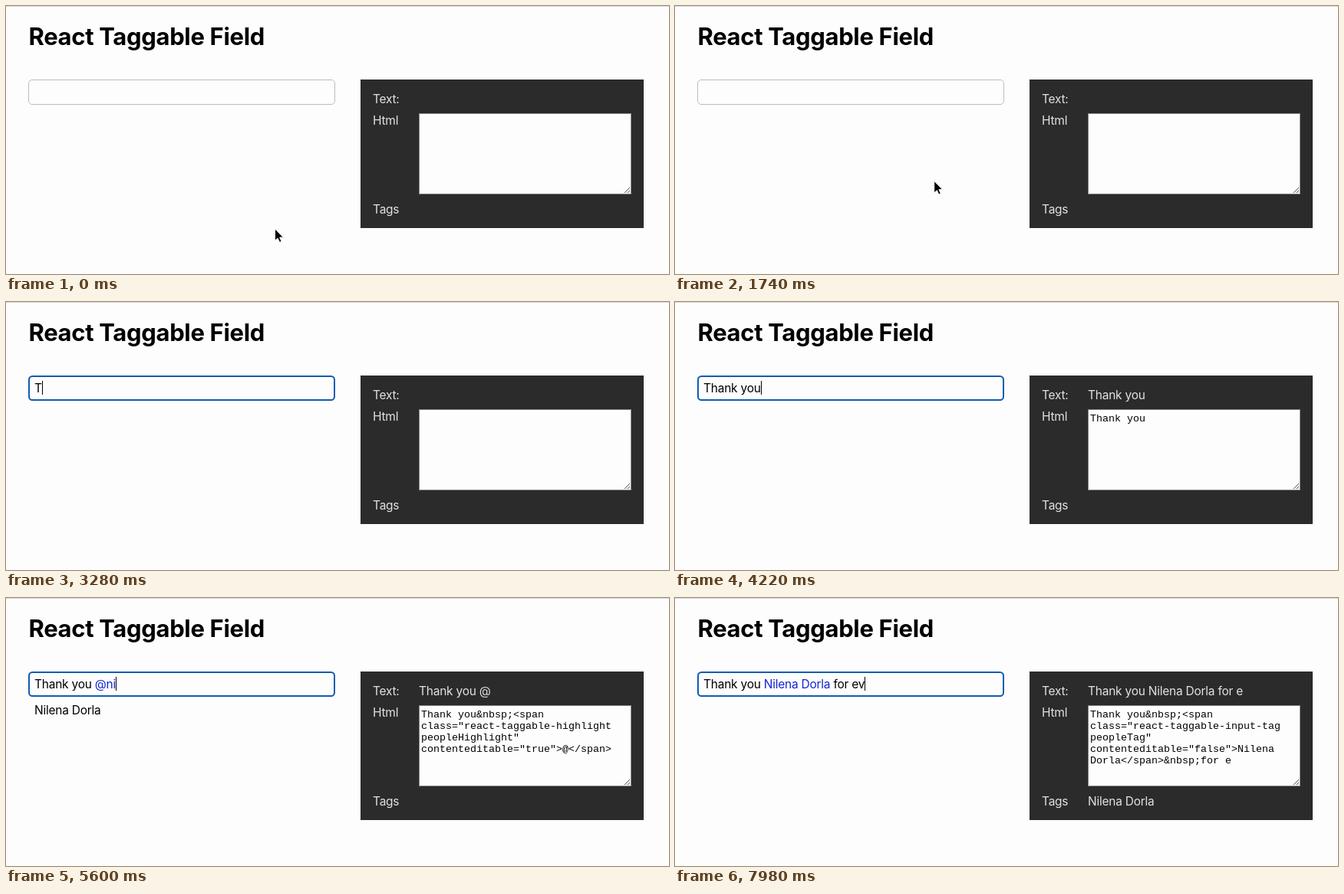
Recreate the animation shown at these times as an HTML page. Size 864 px wide and 350 px high, loop 8 s.

```html
<!DOCTYPE html>
<html lang="en">
<head>
<meta charset="utf-8">
<title>React Taggable Field</title>
<style>
  html, body { margin: 0; width: 100%; height: 100%; overflow: hidden; background: #fdfdfd; }
  svg { display: block; width: 864px; height: 350px; }
  text { font: 15.5px Inter, sans-serif; letter-spacing: -0.24px; white-space: pre; fill: #000; }
  .title { font-size: 31px; font-weight: 700; letter-spacing: -0.33px; }
  .panel text { fill: #e2e2e2; }
  .panel .code { font: 13.333px "Liberation Mono", monospace; letter-spacing: 0; fill: #000; }
  .blue { fill: #1226d0; }
</style>
</head>
<body>
<svg viewBox="0 0 864 350">
  <rect width="864" height="350" fill="#fdfdfd"/>
  <rect width="864" height="1" fill="#d8d8d8"/>
  <text class="title" x="29.5" y="51">React Taggable Field</text>

  <rect id="box" fill="#fdfdfd"/>
  <text id="field" x="37" y="118"><tspan id="before"></tspan><tspan id="tag" class="blue"></tspan><tspan id="after"></tspan></text>
  <rect id="caret" y="103" width="1" height="18" fill="#000"/>
  <text id="option" x="37" y="152"></text>

  <g class="panel">
    <rect x="462" y="96" width="369" height="194" fill="#2b2b2b"/>
    <text x="478" y="127">Text:</text>
    <text x="478" y="154.5">Html</text>
    <text x="478" y="271">Tags</text>
    <text id="plain" x="538" y="127"></text>
    <rect x="538.5" y="140.5" width="276" height="105" fill="#fdfdfd" stroke="#858585"/>
    <path d="M806 244l7-7M810 244l3-3" stroke="#555" stroke-width="1"/>
    <g id="code"></g>
    <text id="tags" x="538" y="271"></text>
  </g>

  <path id="mouse" d="M0 0V15.5L3.6 12.2L6.1 17.6L8.6 16.5L6.2 11.2H11Z" fill="#000" stroke="#fdfdfd" stroke-width="1"/>
</svg>
<script>
const LOOP = 8000;
const NAME = "Nilena Dorla";
const MOVE = 1540, ARRIVE = 2040, FOCUS = 2080, PICK = 6300, LAG = 50;
const $ = id => document.getElementById(id);

// [time, key] pairs for the three stretches of typing
const intro = [[3240, "T"], [3340, "h"], [3460, "a"], [3560, "n"], [3680, "k"],
  [3900, " "], [4000, "y"], [4080, "o"], [4160, "u"], [4400, " "]];
const query = [[4820, "@"], [5340, "n"], [5560, "i"]];
const outro = [[7280, "f"], [7360, "o"], [7440, "r"], [7560, " "], [7760, "e"], [7940, "v"]];
const events = [FOCUS, PICK, ...[...intro, ...query, ...outro].map(k => k[0])];

const typed = (keys, t) => keys.filter(k => k[0] <= t).map(k => k[1]).join("");
const set = (el, s) => { if (el.textContent !== s) el.textContent = s; };
const attrs = (el, o) => { for (const k in o) el.setAttribute(k, o[k]); };
const show = (id, on) => $(id).setAttribute("visibility", on ? "visible" : "hidden");
const ease = p => p * p * (3 - 2 * p);

const lines = Array.from({ length: 5 }, (_, i) => {
  const el = document.createElementNS("http://www.w3.org/2000/svg", "text");
  attrs(el, { class: "code", x: 541, y: 155.5 + i * 15 });
  return $("code").appendChild(el);
});

// Trailing spaces are stored as &nbsp;
const nbsp = s => s.replace(/ $/, "&nbsp;");

function markup(t) {
  const start = nbsp(typed(intro, t));
  if (t >= PICK) {
    const [first, last] = NAME.split(" ");
    return [start + "<span", 'class="react-taggable-input-tag', 'peopleTag"',
      'contenteditable="false">' + first, last + "</span>&nbsp;" + nbsp(typed(outro, t))];
  }
  if (t >= query[0][0])
    return [start + "<span", 'class="react-taggable-highlight', 'peopleHighlight"',
      'contenteditable="true">@</span>'];
  return [start];
}

function drawField(t) {
  const focused = t >= FOCUS, picked = t >= PICK;
  attrs($("box"), focused
    ? { x: 30, y: 97, width: 398, height: 31, rx: 4.5, stroke: "#105cb0", "stroke-width": 2 }
    : { x: 29.5, y: 96.5, width: 399, height: 32, rx: 4.5, stroke: "#bdbdbd", "stroke-width": 1 });
  set($("before"), typed(intro, t));
  set($("tag"), picked ? NAME : typed(query, t));
  set($("after"), picked ? " " + typed(outro, t) : "");
  set($("option"), t >= query[0][0] && !picked ? NAME : "");

  // The caret stays lit for half a second after each input
  const last = Math.max(...events.filter(e => e <= t));
  show("caret", focused && (t - last) % 1000 < 500);
  $("caret").setAttribute("x", Math.round(37 + $("field").getComputedTextLength()));
}

function drawPanel(t) {
  const picked = t >= PICK;
  set($("plain"), typed(intro, t) +
    (picked ? NAME + " " + typed(outro, t) : t >= query[0][0] ? "@" : ""));
  set($("tags"), picked ? NAME : "");
  const rows = markup(t);
  lines.forEach((el, i) => set(el, rows[i] || ""));
}

function drawMouse(t) {
  const p = ease(Math.min(1, Math.max(0, (t - MOVE) / (ARRIVE - MOVE))));
  $("mouse").setAttribute("transform", `translate(${350.5 - 36 * p} ${291 - 176 * p})`);
  show("mouse", t < intro[0][0]);
}

function frame() {
  const t = performance.now() % LOOP;
  drawField(t);
  drawPanel(t - LAG);
  drawMouse(t);
  requestAnimationFrame(frame);
}
frame();
</script>
</body>
</html>
```
